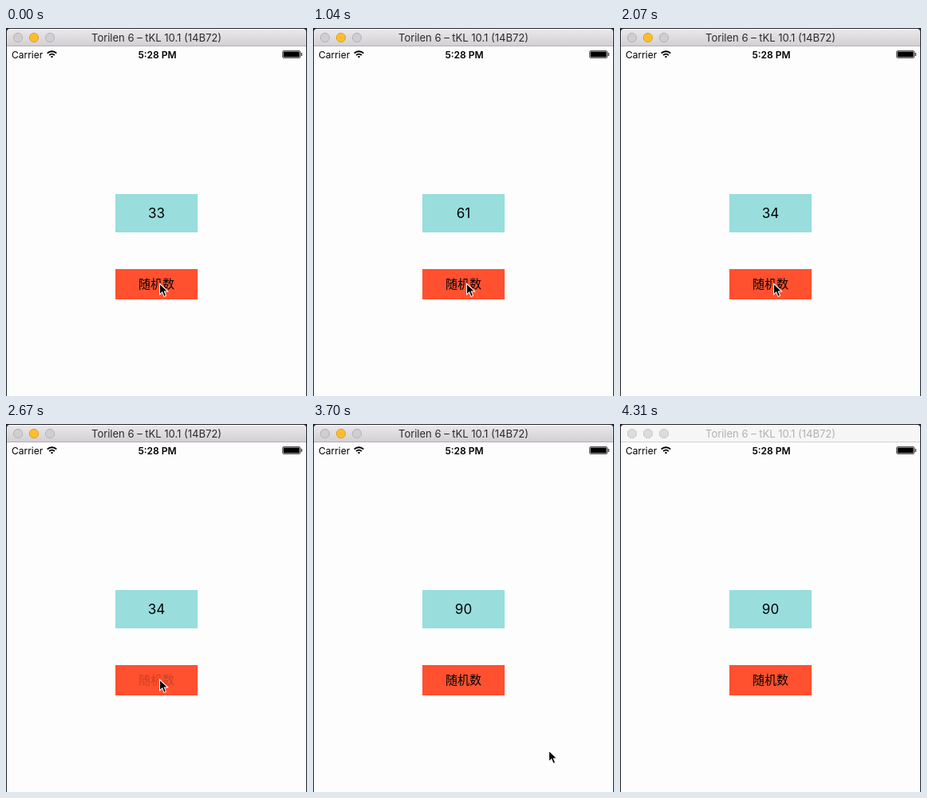
Write an HTML page with a canvas that moves like this. It is 377 px wide and 461 px high and loops after 4.41 s.

```html
<!DOCTYPE html>
<html lang="zh-CN">
<head>
<meta charset="utf-8">
<style>
html, body { margin: 0; width: 100%; height: 100%; overflow: hidden; background: #22242c; }
canvas { display: block; }
</style>
</head>
<body>
<canvas id="stage" width="377" height="461"></canvas>
<script>
const ctx = document.getElementById('stage').getContext('2d');
const LOOP = 4410;
const STEP = 148.3;
const FADE = 320;
const BLUR_AT = 4310;

const taps = [
  { down: 585, up: 590, number: 61 },
  { down: 1625, up: 1740, number: 34 },
  { down: 2660, up: 2810, number: 90 }
];
const pointer = { from: [192, 319], to: [324, 432], start: 3506, duration: 288, hidden: 4000 };

function smooth(u) {
  u = Math.min(1, Math.max(0, u));
  return u * u * (3 - 2 * u);
}

function rect(x, y, w, h, color) {
  ctx.fillStyle = color;
  ctx.fillRect(x, y, w, h);
}

function text(str, x, y, font, color = '#000', align = 'center') {
  ctx.font = font;
  ctx.fillStyle = color;
  ctx.textAlign = align;
  ctx.fillText(str, x, y);
}

function rounded(x, y, w, h, r) {
  ctx.beginPath();
  ctx.roundRect(x, y, w, h, r);
}

function drawTitleBar(active) {
  const shade = ctx.createLinearGradient(0, 1, 0, 22);
  shade.addColorStop(0, active ? '#ebe9eb' : '#f6f6f6');
  shade.addColorStop(1, active ? '#d2d0d2' : '#f6f6f6');
  ctx.fillStyle = shade;
  rounded(1, 1, 375, 22, [4, 4, 0, 0]);
  ctx.fill();
  rect(4, 1, 369, 1, active ? '#f6f5f6' : '#fbfbfb');
  rect(1, 22, 375, 1, active ? '#b1afb1' : '#d1d1d1');

  for (let i = 0; i < 3; i++) {
    const lit = active && i === 1;
    ctx.beginPath();
    ctx.arc(15 + 20 * i, 12, 5.6, 0, 7);
    ctx.fillStyle = lit ? '#fdbd2e' : active ? '#d0ced0' : '#dcdcdc';
    ctx.strokeStyle = lit ? '#dfa023' : active ? '#b5b3b5' : '#c9c9c9';
    ctx.lineWidth = 1;
    ctx.fill();
    ctx.stroke();
  }
  text('Torilen 6 – tKL 10.1 (14B72)', 188.5, 17, '13px Inter, sans-serif', active ? '#2b2a2b' : '#b0b0b0');
}

function drawStatusBar() {
  text('Carrier', 7, 38, '12px Inter, sans-serif', '#000', 'left');
  text('5:28 PM', 189.5, 38, '600 12px Inter, sans-serif');

  ctx.strokeStyle = '#000';
  ctx.lineWidth = 1.9;
  for (let r = 1.3; r < 9; r += 3.45) {
    ctx.beginPath();
    ctx.arc(57.5, 37.5, r, -Math.PI * .75, -Math.PI * .25);
    ctx.stroke();
  }

  ctx.lineWidth = 1;
  ctx.strokeStyle = '#555';
  rounded(346.5, 28.5, 22, 9, 1.5);
  ctx.stroke();
  rect(347.5, 29.5, 20, 7, '#000');
  rect(369.5, 31, 1.5, 4, '#444');
}

function drawPointer(t) {
  if (t >= pointer.hidden) return;
  const u = smooth((t - pointer.start) / pointer.duration);
  const [x, y] = pointer.from.map((a, i) => Math.round(a + (pointer.to[i] - a) * u));
  const arrow = new Path2D('M1 2.4V13.8L3.9 11.1 6.3 16.8 7.9 16.1 5.5 10.5H9.4Z');
  ctx.save();
  ctx.translate(x, y);
  ctx.strokeStyle = '#fff';
  ctx.lineWidth = 2;
  ctx.stroke(arrow);
  ctx.fillStyle = '#000';
  ctx.fill(arrow);
  ctx.restore();
}

function drawControls(t) {
  const released = taps.filter(tap => t >= tap.up).pop();
  const pressed = taps.some(tap => t >= tap.down && t < tap.up);
  const fade = released ? smooth((t - released.up) / FADE) : 1;
  const alpha = pressed ? .2 : .2 + .8 * fade;

  rect(137, 208, 103, 48, '#99dddd');
  text(released ? released.number : 33, 188.5, 238, '17px Inter, sans-serif');
  rect(137, 302, 103, 38, '#ff512f');
  text('随机数', 188.5, 326, '15px "Noto Sans CJK SC", "Noto Sans CJK", sans-serif', `rgba(0, 0, 0, ${alpha})`);
}

function draw(now) {
  const t = now % LOOP;
  const held = Math.floor((t + 7) / STEP) * STEP;
  rect(0, 0, 377, 461, '#22242c');
  rect(1, 23, 375, 438, '#fdfdfd');
  drawTitleBar(t < BLUR_AT);
  drawStatusBar();
  drawControls(held);
  drawPointer(held);
}

function tick() {
  draw(performance.now());
  requestAnimationFrame(tick);
}
tick();
</script>
</body>
</html>
```
